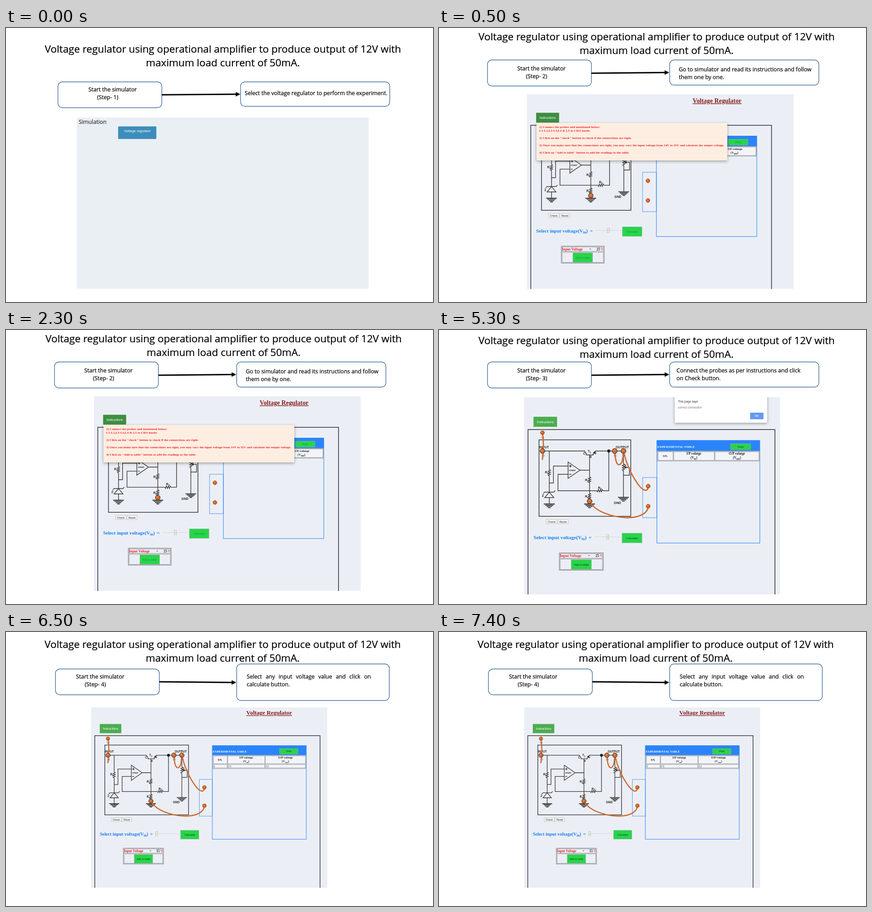
Animation of 933x600 px, one loop 8000 ms. Source, as an HTML page:

```html
<!DOCTYPE html>
<html lang="en">
<head>
<meta charset="utf-8">
<title>Voltage regulator</title>
<style>
  html, body { margin: 0; width: 100%; height: 100%; overflow: hidden; background: #fff; }
  svg { display: block; width: 100vw; height: 100vh; }
  .open { font-family: "Open Sans", sans-serif; stroke: currentColor; stroke-width: .22; }
  .sans { font-family: "Liberation Sans", Arial, sans-serif; }
  .serif { font-family: "Liberation Serif", "Times New Roman", serif; font-weight: bold; }
  .wire { fill: none; stroke: #333; stroke-width: 1.4; }
  .earth { fill: none; stroke: #333; stroke-width: 1.9; }
  .cord { fill: none; stroke: #cf6b32; stroke-width: 2.8; stroke-linecap: round; }
</style>
</head>
<body>
<svg id="stage" viewBox="0 0 933 600" xmlns="http://www.w3.org/2000/svg"></svg>
<script>
const LOOP = 8000;
const STARTS = [0, 500, 3500, 6500];
const PANEL = '#ebeff5';

// Drawing helpers
const text = (x, y, size, str, fill = '#000', cls = 'open', more = '') =>
  `<text x="${x}" y="${y}" font-size="${size}" fill="${fill}" color="${fill}" class="${cls}" ${more}>${str}</text>`;
const mid = (x, y, size, str, fill, cls, more = '') =>
  text(x, y, size, str, fill, cls, `text-anchor="middle" ${more}`);
const rect = (x1, y1, x2, y2, fill, more = '') =>
  `<rect x="${x1}" y="${y1}" width="${x2 - x1}" height="${y2 - y1}" fill="${fill}" ${more}/>`;
const frame = (x1, y1, x2, y2, stroke, width = 1) =>
  rect(x1, y1, x2, y2, 'none', `stroke="${stroke}" stroke-width="${width}"`);
const path = (d, cls = 'wire', more = '') => `<path d="${d}" class="${cls}" ${more}/>`;
const sub = str => `<tspan dy="2" font-size="76%">${str}</tspan>`;
const volt = str => `V${sub(str)}<tspan dy="-2">)</tspan>`;

const heading = (x, y) =>
  mid(x, y, 22.24, 'Voltage regulator using operational amplifier to produce output of 12V with') +
  mid(x, y + 30, 22.24, 'maximum load current of 50mA.');

const box = (x1, y1, x2, y2) =>
  rect(x1, y1, x2, y2, '#fff', 'rx="9.5" stroke="#44719f" stroke-width="1.4"');

const arrow = (x1, y1, x2, y2) =>
  `<path d="M${x1} ${y1}L${x2 - 8} ${y2}" stroke="#000" stroke-width="3"/>` +
  `<path d="M${x2 - 10} ${y2 - 5}L${x2} ${y2}L${x2 - 10} ${y2 + 5}Z"/>`;

const start = (x, y, step) =>
  text(x, y, 12.13, 'Start the simulator') + text(x + 19, y + 17, 12.13, `(Step- ${step})`);

const note = (x, y, lines, more) =>
  lines.map((s, i) => text(x, y + 17 * i, 12.13, s, '#000', 'open', i ? '' : more)).join('');

// Circuit parts
function zigzag(x, y, len, flat) {
  let d = `M${x} ${y}`;
  for (let i = 0; i < 6; i++) {
    const along = (i + 0.5) * len / 6, side = i % 2 ? -2.6 : 2.6;
    d += flat ? `L${x + along} ${y + side}` : `L${x + side} ${y + along}`;
  }
  return path(d + (flat ? `L${x + len} ${y}` : `L${x} ${y + len}`));
}

function ground(x, y) {
  let d = '';
  for (let i = 0; i < 4; i++) {
    const w = 12 - 3 * i;
    d += `M${x - w} ${y + 2.7 * i}h${2 * w}`;
  }
  return path(d, 'earth');
}

const knob = (x, y, r, edge) =>
  `<circle cx="${x}" cy="${y}" r="${r}" fill="#cf6227" stroke="${edge}" stroke-width="1"/>` +
  `<circle cx="${x - 0.8}" cy="${y - 1}" r="${r * 0.45}" fill="#e48247"/>`;

const label = (x, y, str, size = 7) =>
  text(x, y, size, str, '#222', 'sans', 'font-weight="bold"');

function circuit() {
  return frame(218.5, 240.5, 419, 408, '#333', 1.5) +
    path('M226 265H318L323 272.5M321 273.5H338M336 272.5L342 265H403V293' +
      'M329 274V322M329 334V358M329 370V381' +
      'M241 265V306M241 319V355M241 367V381' +
      'M282 298H250V335H241M282 316H260V352H345M358 352H371V265' +
      'M308 307H329M403 308V366M405 301H416V318H403') +
    path('M342 265l-5.5 3.2l3.6 3z', '', 'fill="#222"') +
    path('M404 301l5 -2.6v5.2z', '', 'fill="#222"') +
    path('M282 289V325L308 307Z') +
    path('M284 298h6M287 295v6M284 316h5') +
    path('M241 355L231 367H251ZM228 358L231 355H251L254 351.5') +
    zigzag(241, 306, 13) + zigzag(329, 322, 12) + zigzag(329, 358, 12) +
    zigzag(403, 293, 15) + zigzag(345, 352, 13, true) +
    ground(241, 381) + ground(329, 381) + ground(403, 366.5) +
    '<circle cx="371" cy="265" r="3.4" fill="#222"/>' +
    label(219, 259, 'INPUT', 7) + label(386, 259, 'OUTPUT', 7) +
    label(315, 273, 'C') + label(329, 280, 'B', 6.5) + label(340, 272, 'E', 6.5) +
    label(325, 267.5, 'T' + sub('1')) + label(231.5, 313.5, 'R' + sub('1')) +
    label(319, 331, 'R' + sub('2')) + label(319, 367, 'R' + sub('4')) +
    label(347.5, 348, 'R' + sub('3')) + label(405, 299, 'R', 6) +
    label(225, 365, 'Z') + label(382, 380.5, 'GND') + label(284, 308.5, 'OPAMP', 4.1);
}

function probes() {
  const tag = (x, y, s) => mid(x, y, 6, s, '#6b57b5', 'sans');
  return path('M226 225C229 245 229 262 226 283' +
      'M384 265C385 284 388 296 394 295C401 293 402 280 403 265' +
      'C409 292 421 318 435 338C446 353 457 356 457 342' +
      'M329 375C339 396 376 410 411 411C440 411 457 400 457 386', 'cord') +
    tag(227, 237, 'L1') + tag(228, 277, 'L2') + tag(385, 277, 'L3') + tag(404, 277, 'L4') +
    knob(226, 225, 4.3, '#a5481a') + knob(226, 265, 5.4, '#333') +
    knob(384, 265, 5.6, '#333') + knob(403, 265, 5.6, '#333');
}

const green = (x1, y1, x2, y2, str, ink) =>
  rect(x1, y1, x2, y2, '#27d549', 'stroke="#8fae9b" stroke-width=".8"') +
  mid((x1 + x2) / 2, (y1 + y2) / 2 + 2.2, 6.1, str, ink, 'sans');

const small = (x1, x2, str) =>
  rect(x1, 415, x2, 424, '#f6f6f6', 'stroke="#b5b5b5" stroke-width=".8"') +
  mid((x1 + x2) / 2, 422, 6.1, str, '#222', 'sans');

function table(row, ink) {
  const line = '#8c8f94';
  const cell = (x1, x2, y1, y2) => frame(x1, y1, x2, y2, line, 0.9);
  const cols = [[478.5, 511.5], [513, 601.5], [603, 699]];
  let s = rect(476, 242, 701, 466.5, 'none', 'stroke="#3a8aff" stroke-width="1.2"') +
    rect(476, 241.5, 701, 265, '#2b84fb') +
    text(477, 258, 7.05, 'EXPERIMENTAL TABLE', '#fff', 'serif') +
    green(637, 249, 681, 262, 'Print', ink) +
    rect(477, 265, 700.5, row ? 297 : 287, '#f2f4f8', `stroke="${line}" stroke-width=".9"`) +
    cols.map(([a, b]) => cell(a, b, 266.5, 285.5)).join('') +
    mid(494.5, 278, 7.1, 'SN.', '#222', 'serif') +
    mid(557, 273, 7.2, 'I/P volatge', '#222', 'serif') +
    mid(557, 281.5, 7.2, '(' + volt('in'), '#222', 'serif') +
    mid(651, 273, 7.2, 'O/P volatge', '#222', 'serif') +
    mid(651, 281.5, 7.2, '(' + volt('out'), '#222', 'serif');
  if (row) {
    s += cols.map(([a, b], i) => cell(a, b, 287, 295.5) +
      text(a + 0.8, 294, 7.4, row[i], '#333', 'serif', 'style="font-weight:normal"')).join('');
  }
  return s;
}

function lab({ wired, volts, thumb, row, ink = '#0b3d18', tab = '#4bad50' }) {
  const blue = '#1b7cf0', line = '#8c8f94';
  return mid(612, 168, 14.2, 'Voltage Regulator', '#861d1d', 'serif', 'text-decoration="underline"') +
    rect(206.5, 190, 258, 212, tab) +
    mid(232.3, 203.6, 7.2, 'Instructions', '#fff', 'sans') +
    frame(194.5, 218, 734, 700, '#2a2a2a', 1.5) +
    circuit() + frame(445, 323, 476, 411, '#4a8ff5') + table(row, ink) +
    (wired ? probes() : '') +
    knob(329, 375, 5.4, '#333') + knob(457, 342, 4.4, '#a5481a') + knob(457, 386, 4.4, '#a5481a') +
    small(234, 258, 'Check') + small(259.8, 282.5, 'Reset') +
    text(206.5, 458, 11.2, 'Select input voltage(' + volt('in'), blue, 'serif') +
    text(327, 458, 11.2, '=', blue, 'serif') +
    rect(339, 452.3, 397, 453.7, '#dcdcd8') +
    rect(thumb - 2.3, 448, thumb + 2.3, 458, '#f3f2ee', 'stroke="#b9b6ae" stroke-width=".9"') +
    rect(thumb - 1, 452, thumb + 1, 454.5, '#c5c2ba') +
    green(400, 445, 443.5, 466, 'Calculate', ink) +
    frame(263, 488, 359, 526, line, 1.3) + frame(264.8, 489.8, 357.2, 499.8, line, 0.9) +
    frame(264.8, 501.6, 357.2, 524.4, line, 0.9) +
    text(264.5, 497.3, 8, 'Input Voltage', '#ee1c25', 'serif') +
    text(325.5, 497.3, 8, '=', '#ee1c25', 'serif') +
    text(342, 497.3, 8, volts, '#222', 'serif') + text(351.5, 497.3, 8, 'V', '#ee4a4a', 'serif') +
    green(289, 503, 333, 524, 'Add to table', ink);
}

// A clipped panel holding the scaled simulator
const panel = (id, x1, y1, x2, y2, move, body, over = '') =>
  `<clipPath id="${id}">${rect(x1, y1, x2, y2, '#000')}</clipPath>` +
  `<g clip-path="url(#${id})">${rect(x1, y1, x2, y2, PANEL)}<g transform="${move}">${body}</g>${over}</g>`;

const shadow = 'style="filter:drop-shadow(0 2px 3px rgba(0,0,0,.35))"';

function popup() {
  const lines = [
    [219, '1) Connect the probes and mentioned below:'],
    [227, 'L1-L2,L3-L4,L4 &amp; L5 to CRO knobs'],
    [243, '2) Click on the "check" button to check if the connections are right.'],
    [259, '3) Once you make sure that the connections are right, you may vary the input voltage from 14V to 35V and calculate the output voltage.'],
    [275, '4) Click on "Add to table" button to add the readings to the table.']
  ];
  return rect(213, 208, 630, 290, '#fdeee1', shadow) +
    lines.map(([y, s]) => text(219, y, 7, s, '#f0202a', 'serif')).join('');
}

const dialog = () =>
  rect(515, 130, 717, 203, '#fff', shadow) +
  text(522, 159, 6.5, 'This page says', '#333', 'sans') +
  text(522, 171.5, 6.4, 'correct connection', '#777', 'sans') +
  rect(680, 181, 709, 195.5, '#6499f5', 'rx="1"') +
  mid(694.5, 190.3, 5.6, 'OK', '#fff', 'sans', 'font-weight="bold"');

const slides = [
  heading(474, 54) + box(113.5, 118, 340.5, 174.5) + box(512.5, 118, 838.5, 171.5) +
    arrow(340, 146.3, 512, 145) + start(180, 139, 1) +
    note(521.5, 147, ['Select the voltage regulator to perform the experiment.']) +
    rect(155, 196, 792.5, 571, '#eaeff4') +
    text(159, 209.5, 12.2, 'Simulation', '#333') +
    rect(245, 215.5, 328.5, 243, '#3c8dbc', 'rx="1.5"') +
    mid(287, 228, 7.75, 'Voltage regulator', '#fff', 'sans'),

  heading(475.5, 27) + box(106, 70, 333, 127) + box(504, 70, 830, 125) +
    arrow(333, 99, 503, 97.5) + start(171, 93, 2) +
    note(524, 95, ['Go to simulator and read its instructions and follow', 'them one by one.']) +
    panel('p2', 192, 145, 775, 571.5, 'matrix(.975 0 0 .98 10.9 -.6)',
      lab({ volts: 25, thumb: 368.4, ink: '#15913a', tab: '#3e8e41' }), popup()),

  heading(475.5, 31) + box(106, 70, 333, 127) + box(504, 70, 830, 125) +
    arrow(333, 99, 503, 97.5) + start(171, 93, 3) +
    note(519, 93, ['Connect the probes as per instructions and click', 'on Check button.']) +
    panel('p3', 185.5, 147, 745.5, 579, '',
      lab({ wired: true, volts: 25, thumb: 368.4 }), dialog()),

  heading(473.5, 35) + box(108, 81, 335, 137.5) + box(504, 70, 837.5, 150) +
    arrow(335, 109, 503, 110.5) + start(153, 102, 4) +
    note(526, 102, ['Select any input voltage value and click on', 'calculate button.'], 'word-spacing="4.9"') +
    panel('p4', 186, 165, 702, 560, 'matrix(.9125 0 0 .9125 16.5 28.1)',
      lab({ wired: true, volts: 15, thumb: 342.5, row: [1, 15, 12] }))
];

const stage = document.getElementById('stage');
stage.innerHTML = rect(0, 0, 933, 600, '#fff') + slides.map(s => `<g class="slide">${s}</g>`).join('');
const groups = [...stage.querySelectorAll('.slide')];

function render(ms) {
  const t = ms % LOOP;
  const now = STARTS.filter(s => s <= t).length - 1;
  groups.forEach((g, i) => { g.style.display = i === now ? '' : 'none'; });
}

const began = performance.now();
function tick() {
  render(performance.now() - began);
  requestAnimationFrame(tick);
}
tick();
</script>
</body>
</html>
```
